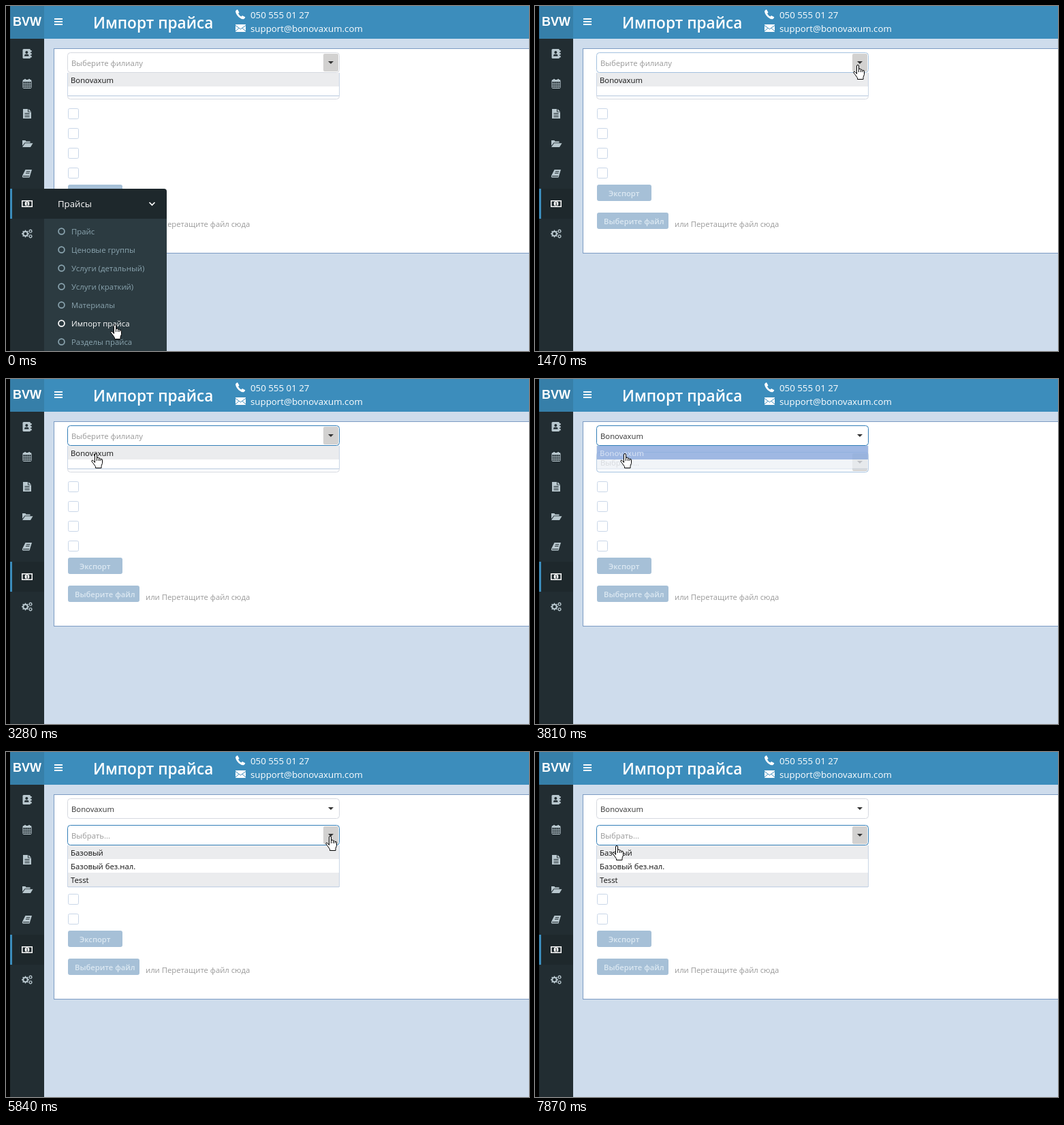
Write an HTML page with a canvas that moves like this. It is 768 px wide and 506 px high and loops after 7990 ms.

```html
<!DOCTYPE html>
<html lang="ru">
<head>
<meta charset="utf-8">
<title>Импорт прайса</title>
<style>
html, body { margin: 0; width: 100%; height: 100%; overflow: hidden; background: #cedcec; }
canvas { display: block; width: 100vw; height: 100vh; }
</style>
</head>
<body>
<canvas id="stage" width="768" height="506"></canvas>
<script>
const ctx = document.getElementById('stage').getContext('2d');
const SANS = '"Open Sans", "Noto Sans", sans-serif';
const BRAND = 'Bonovaxum';
const BORDER = { idle: '#d6d9e0', hover: '#a3c1df', focus: '#337fb8' };

const LOOP = 7990;
const STEP = 133;
const TIME = { leaveMenu: 500, focus: 1620, close: 1890, reopen: 2480, pick: 3680, openSecond: 5840 };

// Where the pointer comes to rest, and how many steps it takes to get there
const START = { x: 153, y: 467 };
const MOVES = [
  { at: 630, steps: 2, x: 291, y: 465 },
  { at: 1050, steps: 3, x: 422, y: 118 },
  { at: 1470, steps: 3, x: 467, y: 86 },
  { at: 3280, steps: 4, x: 125, y: 109 },
  { at: 4600, steps: 3, x: 491, y: 152 },
  { at: 4750, steps: 1, x: 572, y: 137 },
  { at: 4910, steps: 1, x: 561, y: 131 },
  { at: 5200, steps: 2, x: 489, y: 127 },
  { at: 5590, steps: 3, x: 469, y: 123 },
  { at: 7480, steps: 1, x: 200, y: 123 },
  { at: 7870, steps: 3, x: 113, y: 137 }
];

const HAND = new Path2D('M5.5 13.5V2Q5.5.5 7 .5T8.5 2V7.5Q8.5 6 10 6T11.5 7.5Q12.7 6.5 14 8.5Q16.5 7.5 16.5 10V14.5L15 18.5V21.5H6.5V19.5L3 14.5.8 11.8Q.5 10.3 1.8 10.2T5.5 13.5ZM8.5 7.5V11M11.5 8V11M14 9V11');
const ARROW = new Path2D('M.5.5V16.5L4.2 13 6.8 18.8 9.2 17.7 6.7 12.1H11.5Z');

function rect(x, y, w, h, color) {
  ctx.fillStyle = color;
  ctx.fillRect(x, y, w, h);
}

function box(x, y, w, h, radius, fill, stroke) {
  ctx.beginPath();
  ctx.roundRect(x, y, w, h, radius);
  if (fill) { ctx.fillStyle = fill; ctx.fill(); }
  if (stroke) { ctx.strokeStyle = stroke; ctx.lineWidth = 1; ctx.stroke(); }
}

function ring(x, y, r, width, color) {
  ctx.beginPath();
  ctx.arc(x, y, r, 0, 2 * Math.PI);
  ctx.strokeStyle = color;
  ctx.lineWidth = width;
  ctx.stroke();
}

function dot(x, y, r, color) {
  ctx.beginPath();
  ctx.arc(x, y, r, 0, 2 * Math.PI);
  ctx.fillStyle = color;
  ctx.fill();
}

function line(path, color, width) {
  ctx.strokeStyle = color;
  ctx.lineWidth = width;
  ctx.stroke(new Path2D(path));
}

function shape(path, color) {
  ctx.fillStyle = color;
  ctx.fill(new Path2D(path));
}

function text(str, x, y, size, color, weight = 400, family = SANS) {
  ctx.font = `${weight} ${size}px ${family}`;
  ctx.fillStyle = color;
  ctx.fillText(str, x, y);
}

function at(x, y, draw) {
  ctx.save();
  ctx.translate(x, y);
  draw();
  ctx.restore();
}

function gear(x, y, r, color) {
  ring(x, y, r, r * .65, color);
  for (let i = 0; i < 8; i++) {
    const a = i * Math.PI / 4;
    dot(x + Math.cos(a) * r * 1.38, y + Math.sin(a) * r * 1.38, r * .28, color);
  }
}

// Sidebar icons, each drawn around its own centre
const ICONS = [
  function contacts(c, bg) {
    box(-6.5, -7, 11.5, 14, 1.5, c);
    for (let y = -5; y < 6; y += 4) rect(5, y, 1.7, 2.5, c);
    dot(-.7, -2, 2, bg);
    box(-4, .8, 6.5, 2.8, [2, 2, 0, 0], bg);
  },
  function calendar(c) {
    box(-6, -5.5, 12, 12, 1, null, c);
    rect(-6, -5.5, 12, 2.5, c);
    for (const x of [-3, 3]) rect(x - 1, -7, 2, 3, c);
    line('M-6 .2H6M-6 3.4H6M-3-3V6M0-3V6M3-3V6', c, .8);
  },
  function page(c, bg) {
    shape('M-6-7H1V-2.5H6V7H-6ZM2-7L6-3.3H2Z', c);
    for (let y = -1; y < 5; y += 2.5) rect(-3.5, y, 7, 1, bg);
  },
  function folder(c) {
    shape('M-7 3V-5H-2.5L-1.5-3.5H4.5V-1.5H-3.5ZM-3-.7H8.5L5 5H-7Z', c);
  },
  function book(c, bg) {
    shape('M-2.5-6H7L3.5 5.5H-6.5Q-8 4-6.5 2Z', c);
    line('M-1.2-3.2H4.2M-2-.8H3.5M-6 3.5H3', bg, 1);
  },
  function money(c, bg) {
    rect(-8, -5, 16, 10, c);
    rect(-6.5, -3.5, 13, 7, bg);
    dot(0, 0, 3.4, c);
    line('M-1-1.2L.2-2V2M-1.2 2H1.6', bg, 1);
  },
  function gears(c) {
    gear(-2.5, 0, 3.3, c);
    for (const y of [-3.8, 3.8]) gear(5, y, 1.8, c);
  }
];

function header() {
  rect(56, 0, 712, 48, '#3c8dbc');
  rect(6, 0, 50, 48, '#367fa9');
  text('BVW', 10, 29, 18, '#fff', 700, '"Liberation Sans", sans-serif');
  for (let y = 18; y < 28; y += 4) rect(71, y, 12, 2, '#fff');
  text('Импорт прайса', 128, 33, 22.6, '#fff', 600);
  at(337, 5, () => shape('M0 2.5Q1 .5 3 0L5.5 4.5 4 6Q5.5 9 8.5 10.5L10 9 14.3 11.3Q14 13.5 12 14.2 9 14.8 5 11.5.5 7.5 0 2.5Z', '#fff'));
  at(337, 27, () => {
    rect(0, 0, 15, 11, '#fff');
    line('M0 1.5L7.5 7 15 1.5M0 10L5 5.5M15 10L10 5.5', '#3c8dbc', 1);
  });
  text('050 555 01 27', 359, 18, 13.3, '#fff', 500);
  text('support@bonovaxum.com', 359, 38, 13.3, '#fff', 500);
}

function sidebar() {
  rect(0, 0, 6, 506, '#000');
  rect(6, 48, 50, 458, '#222d32');
  rect(6, 268, 50, 44, '#1e282c');
  rect(6, 268, 3, 44, '#3c8dbc');
  ICONS.forEach((draw, i) => {
    const colors = draw.name === 'money' ? ['#fff', '#1e282c'] : ['#b8c7ce', '#222d32'];
    at(31, 70 + 44 * i, () => draw(...colors));
  });
}

function flyout() {
  rect(56, 312, 180, 194, '#2c3b41');
  box(56, 268, 180, 44, [0, 4, 0, 0], '#1e282c');
  text('Прайсы', 76, 295, 13.2, '#fff');
  line('M210.5 288L214.5 292 218.5 288', '#fff', 1.7);
  const items = ['Прайс', 'Ценовые группы', 'Услуги (детальный)', 'Услуги (краткий)',
    'Материалы', 'Импорт прайса', 'Разделы прайса'];
  items.forEach((item, i) => {
    const y = 331 + 27 * i;
    const color = i === 5 ? '#fff' : '#8aa4af';
    ring(81.5, y - .5, 4.4, 1.7, color);
    text(item, 96, y + 4, 11.4, color);
  });
}

function select(y, label, filled, state, pressed) {
  box(90.5, y + .5, 399, 29, 4, '#fff', BORDER[state]);
  text(label, 96, y + 20, 11.3, filled ? '#333' : '#999');
  if (pressed) box(466, y + 2, 22, 26, 2, '#d2d1d0');
  shape(`M473 ${y + 13}h8l-4 4z`, '#333');
}

// A list hangs right below its select, whose lower border stays visible
function list(y, h, items, alpha = 1, picked = false) {
  ctx.globalAlpha = alpha;
  rect(90, y, 400, h, '#c9d5e5');
  rect(91, y, 398, h - 1, '#fff');
  rect(91, y + h, 398, 1, '#e6ecf4');
  items.forEach((item, i) => {
    const top = y + 20 * i;
    if (i % 2 === 0) rect(91, top, 398, 20, picked ? '#4f7fd0' : '#ebecee');
    text(item, 95, top + 15, 11.3, picked ? '#fff' : '#111', picked ? 600 : 400);
  });
  ctx.globalAlpha = 1;
}

function button(label, x, y, w) {
  box(91, y, w, 24, 3, '#a6c0d7');
  text(label, x, y + 17, 11.2, '#dce8f2', 600);
}

// Opacity of something that vanishes in two steps
function fadeOut(t, start) {
  return t < start ? 1 : t < start + STEP ? .5 : 0;
}

function pointerAt(t) {
  let pos = START;
  for (const move of MOVES) {
    const left = Math.ceil((move.at - t) / STEP);
    const p = 1 - Math.min(Math.max(left / move.steps, 0), 1);
    pos = { x: pos.x + (move.x - pos.x) * p, y: pos.y + (move.y - pos.y) * p };
    if (p < 1) break;
  }
  return pos;
}

function form(t, pointer) {
  rect(56, 48, 712, 458, '#cedcec');
  rect(70, 62, 698, 301, '#7c9bc3');
  rect(71, 63, 697, 299, '#fff');

  const picked = t >= TIME.pick;
  const secondOpen = t >= TIME.openSecond;
  const alpha = t < TIME.reopen ? fadeOut(t, TIME.close) : fadeOut(t, TIME.pick + STEP - 3);
  const over = y => pointer.x < 488 && pointer.y >= y && pointer.y < y + 30;
  const state = (y, focused) => focused ? 'focus' : over(y) ? 'hover' : 'idle';

  const first = state(68, t >= TIME.focus && !secondOpen);
  const second = picked ? state(107, secondOpen) : 'idle';
  select(68, picked ? BRAND : 'Выберите филиалу', picked, first, !picked);
  select(107, 'Выбрать...', false, second, second !== 'idle');

  for (let i = 0; i < 4; i++) box(91.5, 150.5 + 29 * i, 15, 15, 2, '#fff', '#c9d6e8');
  button('Экспорт', 108, 262, 80);
  button('Выберите файл', 101, 303, 105);
  text('или Перетащите файл сюда', 205, 324, 11.3, '#999');

  if (alpha) list(98, 34, [BRAND], alpha, picked);
  if (secondOpen) list(137, 61, ['Базовый', 'Базовый без.нал.', 'Tesst']);
}

function cursor({ x, y }) {
  const onMenu = x < 236 && y > 268;
  const onSelect = x < 488 && y >= 68 && y < 137.5;
  const path = onMenu || onSelect ? HAND : ARROW;
  at(Math.round(x), Math.round(y), () => {
    ctx.fillStyle = '#fff';
    ctx.strokeStyle = '#000';
    ctx.lineWidth = 1;
    ctx.fill(path);
    ctx.stroke(path);
  });
}

function render(t) {
  const pointer = pointerAt(t);
  form(t, pointer);
  header();
  sidebar();
  if (t < TIME.leaveMenu) flyout();
  cursor(pointer);
}

const start = performance.now();
function tick() {
  render((performance.now() - start) % LOOP);
  requestAnimationFrame(tick);
}
tick();
</script>
</body>
</html>
```
